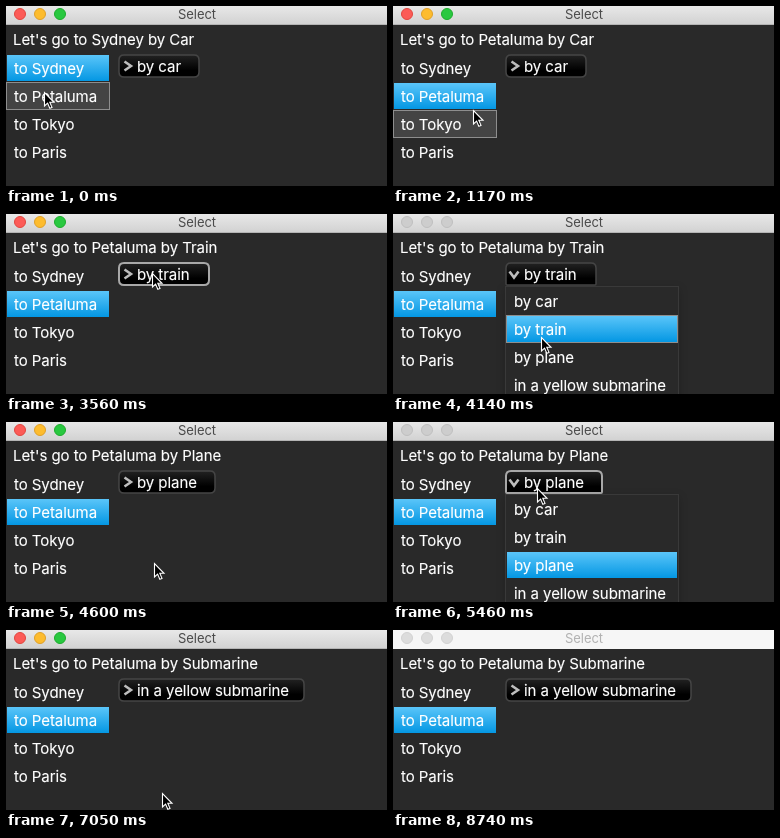
Recreate the animation shown at these times as an HTML page. Size 381 px wide and 180 px high, loop 8.85 s.

```html
<!DOCTYPE html>
<html lang="en">
<head>
<meta charset="utf-8">
<title>Select</title>
<style>
  html, body { margin: 0; width: 100%; height: 100%; overflow: hidden; background: #292929; }
  svg { display: block; width: 381px; height: 180px; cursor: default; }
  text { font: 15px Inter, "Open Sans", sans-serif; letter-spacing: -.06px; fill: #fff; stroke: #fff; stroke-width: .15; }
  .title { font-size: 13px; text-anchor: middle; fill: #4a4a4a; stroke: none; }
  .fill, .edge { fill: none; }
  .hover .fill { fill: #444; }
  .on .fill { fill: url(#blue); }
  .hover .edge { stroke: #8e8e8e; }
  .light { stroke-width: 1; }
  .dim .light { fill: #cdcdcd; stroke: #bfbfbf; }
  .away .bar, .away .line { fill: #f6f6f6; }
  .away .title { fill: #b2b2b2; }
  .away .light { fill: #dcdcdc; stroke: #d2d2d2; }
  .box { fill: url(#black); stroke: #454545; stroke-width: 1.5; }
  .hover .box { stroke: #a8a8a8; stroke-width: 2; }
  .arrow { fill: none; stroke: #bdbdbd; stroke-width: 2.6; }
  .sheet { fill: #292929; stroke: #393939; filter: drop-shadow(0 3px 4px #0003); }
</style>
</head>
<body>
<svg id="stage" viewBox="0 0 381 180" xmlns="http://www.w3.org/2000/svg">
  <defs>
    <linearGradient id="blue" x2="0" y2="1"><stop stop-color="#5ac5f9"/><stop offset="1" stop-color="#0497e3"/></linearGradient>
    <linearGradient id="black" x2="0" y2="1"><stop stop-color="#222"/><stop offset=".7" stop-color="#000"/></linearGradient>
    <linearGradient id="chrome" x2="0" y2="1"><stop stop-color="#e8e8e8"/><stop offset="1" stop-color="#d1d1d1"/></linearGradient>
  </defs>
  <rect width="381" height="180" fill="#292929"/>
  <g id="window">
    <rect class="bar" width="381" height="19" fill="url(#chrome)"/>
    <rect class="line" y="18" width="381" height="1" fill="#b4b4b4"/>
    <circle class="light" cx="14" cy="8" r="5.5" fill="#fc5b57" stroke="#e2463f"/>
    <circle class="light" cx="34" cy="8" r="5.5" fill="#fdbc2e" stroke="#e0a028"/>
    <circle class="light" cx="54" cy="8" r="5.5" fill="#29c840" stroke="#1dac2c"/>
    <text class="title" x="191" y="13">Select</text>
  </g>
  <text id="heading" x="7" y="39"></text>
  <g id="list"></g>
  <g id="button">
    <path class="box"/>
    <path class="arrow"/>
    <text x="131" y="66"></text>
  </g>
  <g id="menu">
    <rect class="sheet" x="112.5" y="72.5" width="173" height="120"/>
  </g>
  <path id="cursor" d="M.5 .5V14L3.6 11.1L5.8 16.3L8 15.4L5.8 10.3H10Z" fill="#000" stroke="#fff" stroke-width="1.1"/>
</svg>
<script>
const LOOP = 8850, ROW = 28;
const $ = id => document.getElementById(id);
const places = ['Sydney', 'Petaluma', 'Tokyo', 'Paris'];
const ways = [
  { label: 'by car', name: 'Car', width: 82 },
  { label: 'by train', name: 'Train', width: 92 },
  { label: 'by plane', name: 'Plane', width: 98 },
  { label: 'in a yellow submarine', name: 'Submarine', width: 187 }
];

// Each choice: menu opens, option is pressed, menu closes
const picks = [
  { open: 1760, press: 2560, close: 2860, way: 1 },
  { open: 3730, press: 4430, close: 4600, way: 2 },
  { open: 5460, press: 6570, close: 7050, way: 3 }
];

// Pointer path: time, x, y
const path = [
  [0, 38, 86], [720, 38, 86], [1020, 62, 116], [1580, 146, 59],
  [1760, 146, 59], [2100, 148, 91], [2260, 149, 111],
  [3160, 149, 111], [3560, 146, 59], [3730, 146, 59], [4300, 148, 141],
  [4660, 148, 141], [5280, 144, 66], [5460, 144, 66], [6040, 156, 163],
  [7830, 156, 163], [8080, 232, 158], [8350, 322, 181], [LOOP, 322, 190]
];

// The outer pixel of a row is kept for its hover outline
function makeRow(parent, x, y, width, label) {
  const g = document.createElementNS('http://www.w3.org/2000/svg', 'g');
  g.innerHTML =
    `<rect class="fill" x="${x + 1}" y="${y + 1}" width="${width - 2}" height="${ROW - 2}"/>` +
    `<rect class="edge" x="${x + .5}" y="${y + .5}" width="${width - 1}" height="${ROW - 1}"/>` +
    `<text x="${x + 8}" y="${y + 20}">${label}</text>`;
  parent.append(g);
  return g;
}

const listRows = places.map((p, i) => makeRow($('list'), 0, 48 + i * ROW, 104, 'to ' + p));
const menuRows = ways.map((w, i) => makeRow($('menu'), 113, 73 + i * ROW, 172, w.label));
const [buttonBox, arrow, buttonText] = $('button').children;

const inside = (p, x, y, w, h) => p.x >= x && p.x < x + w && p.y >= y && p.y < y + h;

// Rounded on top; the lower corners are square while the menu hangs below
function boxPath(width, open) {
  const r = 5, b = open ? 1 : r, w = width - 2;
  return `M${113 + r} 49h${w - 2 * r}q${r} 0 ${r} ${r}V${71 - b}q0 ${b} ${-b} ${b}` +
    `H${113 + b}q${-b} 0 ${-b} ${-b}V${49 + r}q0 ${-r} ${r} ${-r}z`;
}

function pointerAt(t) {
  const i = path.findIndex((p, k) => k > 0 && t < p[0]);
  const [t0, x0, y0] = path[i - 1], [t1, x1, y1] = path[i];
  const u = (t - t0) / (t1 - t0), e = u + .6 * (u * u * (3 - 2 * u) - u);
  return { x: Math.round(x0 + (x1 - x0) * e), y: Math.round(y0 + (y1 - y0) * e) };
}

function setText(node, value) {
  if (node.textContent !== value) node.textContent = value;
}

function draw(t) {
  const pointer = pointerAt(t);
  const place = t < 420 ? 0 : 1;
  const way = picks.reduce((w, p) => t >= p.close ? p.way : w, 0);
  const active = picks.find(p => t >= p.open && t < p.close);
  const pressed = active && t >= active.press ? active.way : -1;

  $('window').setAttribute('class', t >= 8740 ? 'away' : active ? 'dim' : '');
  setText($('heading'), `Let's go to ${places[place]} by ${ways[way].name}`);

  listRows.forEach((row, i) => {
    row.classList.toggle('on', i === place);
    row.classList.toggle('hover', !active && inside(pointer, 0, 48 + i * ROW, 104, ROW));
  });
  menuRows.forEach((row, i) => {
    row.classList.toggle('on', i === way || i === pressed);
    row.classList.toggle('hover', inside(pointer, 113, 73 + i * ROW, 172, ROW));
  });
  $('menu').style.display = active ? '' : 'none';

  const { width, label } = ways[way];
  $('button').classList.toggle('hover', inside(pointer, 112, 48, width, 24));
  buttonBox.setAttribute('d', boxPath(width, active));
  arrow.setAttribute('d', active ? 'M116.5 57.5L121 63.5L125.5 57.5' : 'M118.5 55.5L125 60L118.5 64.5');
  setText(buttonText, label);

  $('cursor').setAttribute('transform', `translate(${pointer.x} ${pointer.y})`);
}

const start = performance.now();
function tick() {
  draw((performance.now() - start) % LOOP);
  requestAnimationFrame(tick);
}
tick();
</script>
</body>
</html>
```
